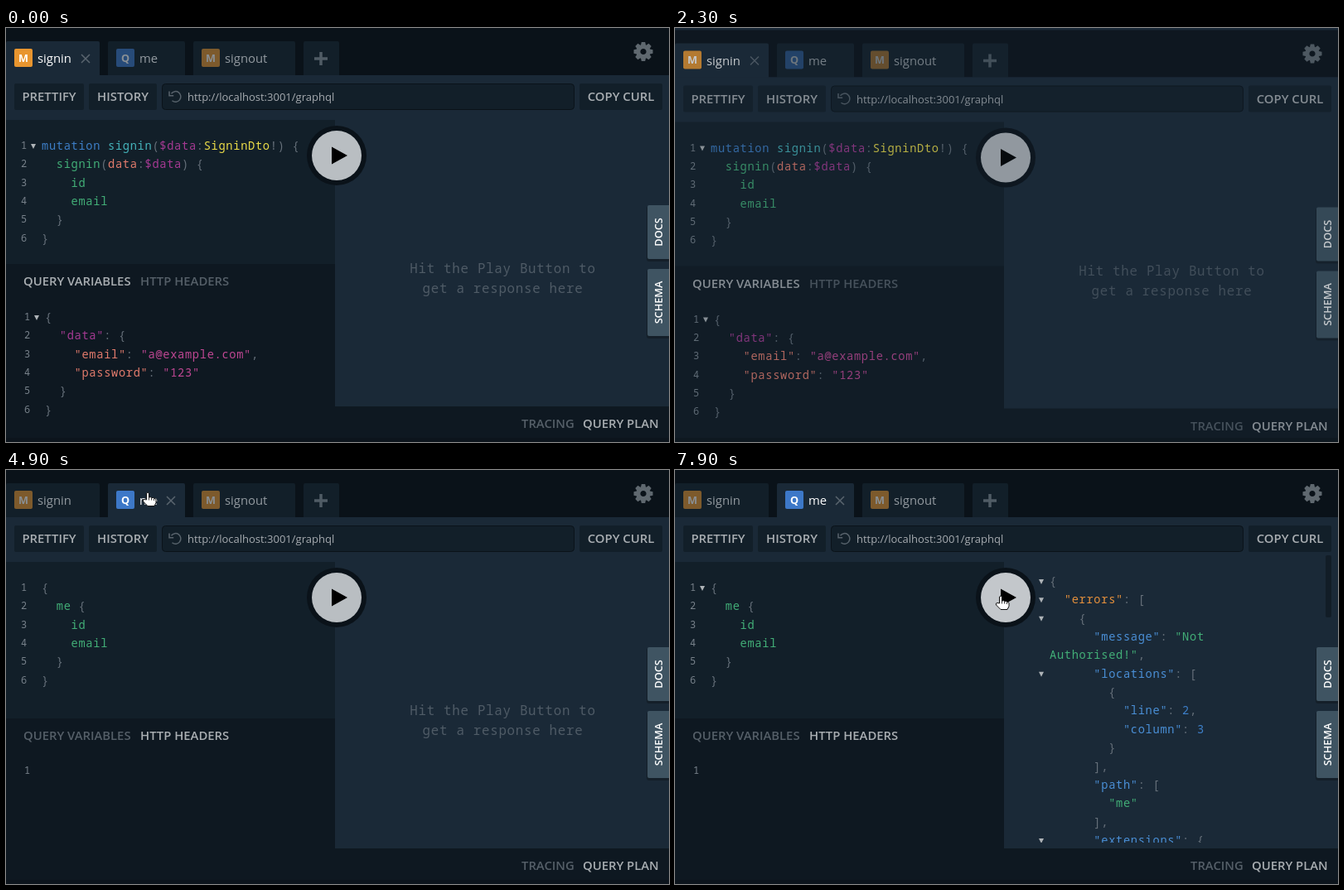
Animation, 800 px wide and 500 px high, one loop 8000 ms. Source, as an HTML page:

```html
<!DOCTYPE html>
<html lang="en">
<head>
<meta charset="utf-8">
<title>API playground</title>
<style>
  html, body { margin: 0; width: 100%; height: 100%; overflow: hidden; background: #1a2937; }
  svg { display: block; width: 100%; height: 100%; }
  text { white-space: pre; font: 14.84px "Open Sans", sans-serif; fill: #fff; }
  .semi { font-weight: 600; fill: #a9aeb2; }
  .dim { fill: #555f68; }
  .side { font-size: 12.7px; font-weight: 600; fill: #fff; text-anchor: middle; }
  .code { font: 13.7px "Noto Sans Mono", monospace; letter-spacing: .68px; fill: #66707a; }
  .num { font: 12px "Noto Sans Mono", monospace; fill: #77818a; }
  .hint { font: 15.8px "Noto Sans Mono", monospace; letter-spacing: .72px; fill: #4f5b66; text-anchor: middle; }
  .k { fill: #3d7fc8 } .d { fill: #45b3ba } .v { fill: #a43a92 } .t { fill: #ebdc48 }
  .f { fill: #42ae77 } .a { fill: #e27b6c } .s { fill: #bf4793 } .e { fill: #e5903c } .b { fill: #4a8fd6 }
  .tab > rect { fill: #121f29; }
  .tab .icon { opacity: .5; }
  .tab .label { fill: #949ba1; }
  .tab .close { visibility: hidden; stroke: #5a656f; stroke-width: 1.5; }
  .tab.on > rect { fill: #1a2937; }
  .tab.on .icon, .tab.hover .icon { opacity: 1; }
  .tab.on .label { fill: #fff; }
  .tab.on .close { visibility: visible; }
</style>
</head>
<body>
<svg id="stage" viewBox="0 0 800 500"></svg>
<script>
const DARK = '#0a1219', PANEL = '#0e1821', EDITOR = '#121f29', NAV = '#1a2937';
const LINE = 22.35;

const rect = (x, y, w, h, fill, more = '') =>
  `<rect x="${x}" y="${y}" width="${w}" height="${h}" fill="${fill}" ${more}/>`;
const text = (x, y, cls, str, more = '') => `<text x="${x}" y="${y}" class="${cls}" ${more}>${str}</text>`;
const group = (id, body, more = '') => `<g id="${id}" ${more}>${body}</g>`;
const fold = (x, y) => `<path d="M${x - 3} ${y - 3}h6l-3 6z" fill="#aeb3b7"/>`;
const paint = line => line.replace(/\[(\w):(.*?)\]/g, '<tspan class="$1">$2</tspan>');
const code = (x, y, lines) => lines.map((l, i) => text(x, y + i * LINE, 'code', paint(l))).join('');
const numbers = (x, y, n) =>
  Array.from({ length: n }, (_, i) => text(x, y + i * LINE, 'num', i + 1)).join('');

function tab(id, x, w, letter, color, label) {
  const cx = x + w - 17;
  return group(id, rect(x, 16, w, 43, EDITOR, 'rx="2"') +
    `<g class="icon">${rect(x + 10, 25, 22, 22, color, 'rx="2"')}` +
    text(x + 21, 40.5, '', letter, 'text-anchor="middle" style="font-size:12.7px;font-weight:700"') + '</g>' +
    text(x + 38, 42, 'label', label) +
    `<path class="close" d="M${cx - 5} 32l10 10m0-10l-10 10"/>`, 'class="tab"');
}

const button = (x, w, label) =>
  rect(x, 67, w, 32, EDITOR, 'rx="2"') +
  text(x + w / 2, 88.3, 'semi', label, 'text-anchor="middle"');

const sideTab = (y, h, label) =>
  rect(773, y + 1, 30, h + 2, '#000', 'rx="3" opacity=".25"') +
  rect(774, y, 30, h, '#3f5462', 'rx="2"') +
  text(0, 0, 'side', label, `transform="translate(792 ${y + h / 2}) rotate(-90)"`);

function gear(x, y) {
  let teeth = '';
  for (let a = 0; a < 360; a += 45)
    teeth += `<path d="M-3.2 -7L-2.2 -11.5H2.2L3.2 -7z" fill="#5f686f" transform="rotate(${a})"/>`;
  return `<g transform="translate(${x} ${y})">${teeth}<circle r="6.1" fill="none" stroke="#5f686f" stroke-width="5"/></g>`;
}

const panelTitles = (y, first, second) =>
  text(21, y, 'semi ' + first, 'QUERY VARIABLES') + text(162, y, 'semi ' + second, 'HTTP HEADERS');

const signin = code(43, 147, [
  '[k:mutation] [d:signin]([v:$data]:[t:SigninDto]!) {',
  '  [f:signin]([a:data]:[v:$data]) {', '    [f:id]', '    [f:email]', '  }', '}'
]) + fold(33, 143) + rect(0, 285, 397, 215, PANEL) + panelTitles(311, '', 'dim') +
  numbers(22, 353, 6) + fold(37, 350) + code(47, 354, [
  '{', '  [v:"data"]: {', '    [a:"email"]: [s:"a@example.com"],', '    [a:"password"]: [s:"123"]', '  }', '}'
]) + group('caret', rect(43, 131, 1, 22, '#a0a6ab'));

const me = code(43, 147, ['{', '  [f:me] {', '    [f:id]', '    [f:email]', '  }', '}']) +
  group('meFold', fold(33, 143)) +
  rect(0, 300, 397, 200, PANEL) + panelTitles(326, 'dim', '') + numbers(22, 367, 1);

const response = code(452, 139, [
  '{', '  [e:"errors"]: [', '    {', '      [b:"message"]: [f:"Not]', '[f:Authorised!"],',
  '      [b:"locations"]: [', '        {', '          [b:"line"]: [k:2],', '          [b:"column"]: [k:3]',
  '        }', '      ],', '      [b:"path"]: [', '        [f:"me"]', '      ],', '      [b:"extensions"]: {'
]) + [0, 1, 2, 5, 14].map(i => fold(442, 135 + i * LINE)).join('') +
  rect(785, 103, 7, 75, '#121d27', 'rx="2"');

const app =
  rect(0, 0, 800, 57, DARK) +
  tab('tabSignin', 0, 113, 'M', '#e8952f', 'signin') +
  tab('tabMe', 123, 93, 'Q', '#3d78c8', 'me') +
  tab('tabOut', 226, 123, 'M', '#e8952f', 'signout') +
  rect(359, 16, 43, 43, EDITOR, 'rx="2"') +
  '<path d="M372 37h16m-8-8v16" stroke="#505c65" stroke-width="3.5"/>' + gear(769, 28.5) +
  rect(0, 57, 800, 443, NAV) +
  button(10, 84, 'PRETTIFY') + button(100, 82, 'HISTORY') + button(692, 100, 'COPY CURL') +
  rect(188.5, 67.5, 497, 31, EDITOR, `rx="4" stroke="${DARK}"`) +
  '<path d="M199.5 79.2A6.3 6.3 0 1 1 200.5 87.7M197 76.5v5.2h5.2" fill="none" stroke="#58636c" stroke-width="1.5"/>' +
  text(219, 88, '', 'http://localhost:3001/graphql', 'style="font-size:13px;fill:#a6abb0"') +
  rect(0, 111, 397, 389, EDITOR) + numbers(18, 146, 6) +
  group('signin', signin) + group('me', me) +
  group('hint', text(599.5, 296, 'hint', 'Hit the Play Button to') + text(599.5, 320, 'hint', 'get a response here')) +
  group('spinner', '<circle r="15.2" fill="none" stroke="#303e4a" stroke-width="5.6"/>' +
    '<path d="M-10.75 -10.75A15.2 15.2 0 0 1 10.75 -10.75" fill="none" stroke="#8d9297" stroke-width="5.6"/>') +
  group('response', response, 'clip-path="url(#pane)"') +
  rect(397, 457, 403, 43, PANEL) +
  text(622, 483, 'semi dim', 'TRACING') + text(696, 483, 'semi', 'QUERY PLAN') +
  sideTab(214, 65, 'DOCS') + sideTab(291, 81, 'SCHEMA') +
  `<circle cx="399" cy="154" r="36" fill="${DARK}"/><circle id="disc" cx="399" cy="154" r="30"/>` +
  group('play', '<path d="M393 143.5l19 10.5-19 10.5z"/>') +
  group('stop', rect(390, 145, 19, 19, '#fff'));

document.getElementById('stage').innerHTML =
  '<clipPath id="pane"><rect x="397" y="100" width="403" height="350"/></clipPath>' +
  rect(0, 0, 800, 500, NAV) + group('app', app) +
  rect(0, 495, 800, 5, '#000', 'opacity=".15"') +
  group('arrow', '<path d="M.5.5v15.5l3.8-3.6 2.5 6 2.6-1.1-2.5-5.8h5.2z" fill="#111" stroke="#fff"/>') +
  group('hand', '<path d="M5.5 10V2q1.5-2 3 0v5q3-.8 3 .6 2.6-.6 3 .8 2.5-.3 2.5 1.6v3.5l-2 4H7L1.5 12q-1-2.5 1.5-2.5z" ' +
    'fill="#fff" stroke="#111"/><path d="M8.5 7v3.500m3-2.500v2.500m3-1.500v2" stroke="#111" stroke-width=".8"/>');

// time, x, y, shape of the pointer
const POINTER = [
  [0, 0, 0, ''], [4100, 15, 107, 'arrow'], [4200, 62, 92, 'arrow'], [4300, 150, 64, 'arrow'],
  [4400, 250, 40, 'hand'], [4500, 205, 36, 'hand'], [4600, 166, 30, 'hand'], [4800, 164, 26, 'hand'],
  [5300, 163, 43, 'hand'], [5500, 220, 82, 'arrow'], [5600, 365, 174, 'arrow'], [5700, 375, 173, 'hand'],
  [5900, 393, 157, 'hand'], [7900, 386, 151, 'hand']
];
const CARET = [[900, 1900], [2600, 3100], [3600, 4100], [4600, 4800]];

const $ = id => document.getElementById(id);
const show = (id, on) => $(id).setAttribute('visibility', on ? 'visible' : 'hidden');

function render(now) {
  const t = Math.floor(now % 8000 / 100) * 100;
  const during = (a, b) => t >= a && t < b;
  const onMe = t >= 4800;

  // The page reloads: blank, then rises while fading in.
  const p = t < 1900 ? 1 : t < 2100 ? 0 : Math.min(1, (t - 2050) / 500);
  const left = (1 - p) ** 2;
  $('app').setAttribute('opacity', 1 - left);
  $('app').setAttribute('transform', `translate(0 ${10 * left})`);

  $('tabSignin').classList.toggle('on', !onMe);
  $('tabMe').classList.toggle('on', onMe);
  $('tabMe').classList.toggle('hover', t >= 4600);
  $('signin').style.display = onMe ? 'none' : '';
  $('me').style.display = onMe ? '' : 'none';
  show('caret', CARET.some(([a, b]) => during(a, b)));
  show('meFold', t >= 5500);

  const loading = during(6100, 6500);
  show('hint', t < 6100);
  show('spinner', loading);
  show('stop', loading);
  show('play', !loading);
  show('response', t >= 6500);
  const turn = 22 + 60 * Math.min(2, (t - 6100) / 100);
  $('spinner').setAttribute('transform', `translate(600 302) rotate(${turn})`);
  $('disc').setAttribute('fill', t >= 5700 ? '#c3c7cb' : '#b9bec2');

  const [, x, y, shape] = POINTER.filter(k => k[0] <= t).pop();
  for (const id of ['arrow', 'hand']) {
    show(id, id === shape);
    $(id).setAttribute('transform', `translate(${x} ${y})`);
  }
}

function loop() {
  render(performance.now());
  requestAnimationFrame(loop);
}
loop();
</script>
</body>
</html>
```
